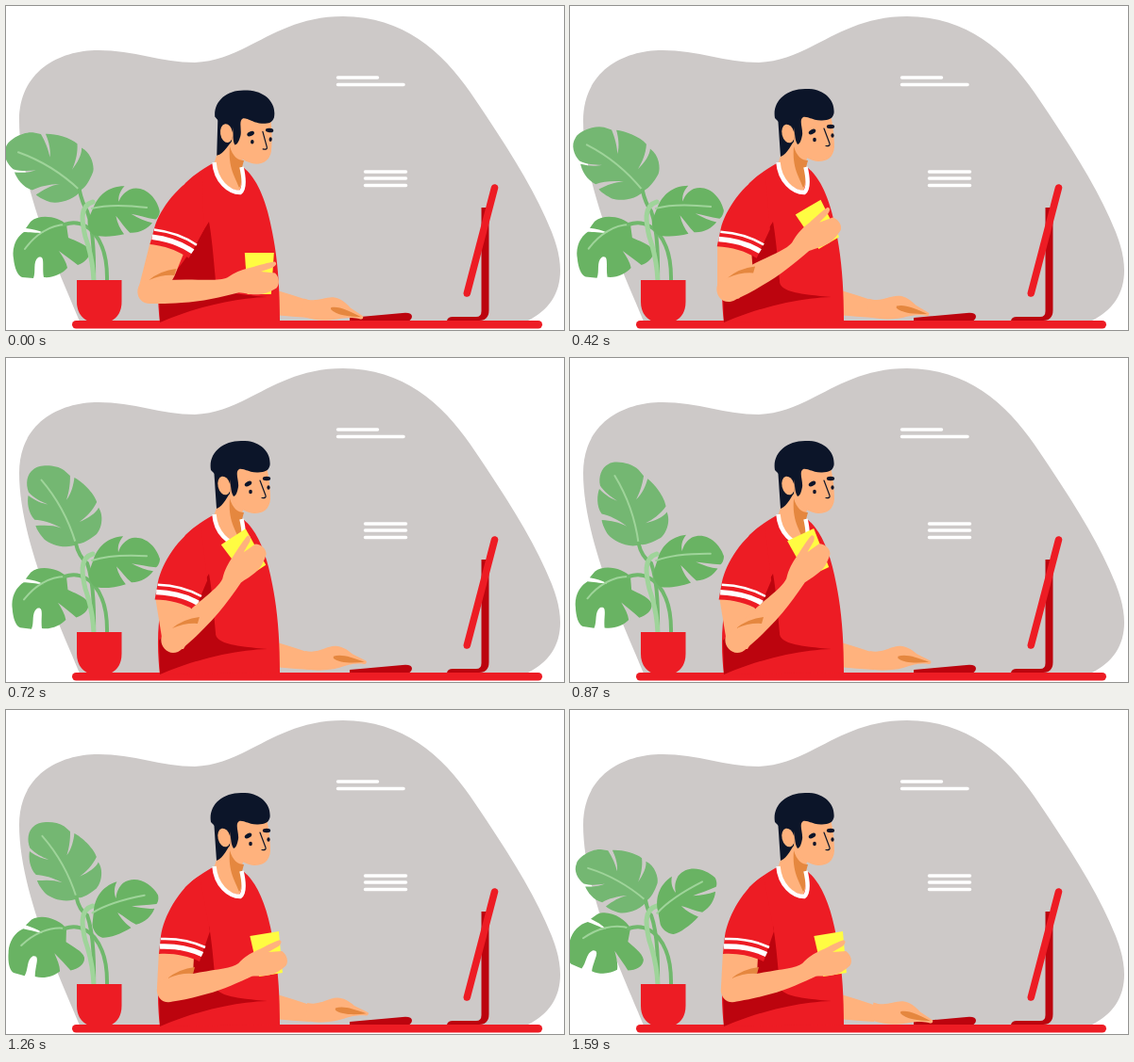
Write an HTML page that moves like this. It is 591 px wide and 344 px high and loops after 1740 ms.

```html
<!DOCTYPE html>
<html lang="en">
<head>
<meta charset="utf-8">
<title>Desk break</title>
<style>
  html, body { margin: 0; height: 100%; overflow: hidden; background: #fff; }
  svg { display: block; width: 100vw; height: 100vh; }
  .red { fill: #ed1c24; } .dark { fill: #bc040e; }
  .skin { fill: #ffb27d; } .shade { fill: #e5873f; } .ink { fill: #0c1529; }
  .leaf { fill: #69b363; } .pale { fill: #74b772; }
  .line { fill: none; stroke-linecap: round; } .flat { stroke-linecap: butt; }
  .white { stroke: #fff; } .stem { stroke: #70b86c; } .vein { stroke: #9fd49a; }
</style>
</head>
<body>
<svg viewBox="0 0 591 344">
  <path fill="#cdc9c8" d="M78 335C60 290 14 195 14 122C14 70 55 47 98 47C135 47 165 60 200 60C255 58 285 11 357 11C420 11 462 48 492 92C530 148 560 195 578 240C596 285 587 318 551 335Z"/>
  <path class="line white" stroke-width="3.5" d="M351.5 76H393.5M351.5 83.5H421M380.5 176H423.5M380.5 183H423.5M380.5 190.5H423.5"/>

  <g id="topLeaf">
    <path class="pale" d="M2 2C-12 2-24-10-27.6-19C-29-24-30-32-29-36C-20-32-12-28-6-21C-12-30-20-38-27-42C-30-52-25-63-21-68C-16-58-12-54-7-50C-12-56-17-63-19-71C-18-80-12-89-3-90C4-92 20-84 25-74L28-66C24-58 18-50 12.5-45C20-48 27-56 31-62C36-55 42-38 40-28C32-22 22-19 14-18C24-17 34-18 39-22C40-10 30 0 24 2C14 4 6 4 2 2Z"/>
    <path class="line vein" stroke-width="2" d="M0 0C5-26 4-54-1-76"/>
  </g>
  <g id="lowLeaf">
    <path class="leaf" d="M0 0C-8-8-28-12-38-3L-43 4C-36 5-30 6-24 9C-32 9-40 8-45 8C-54 14-58 26-56 36C-55 46-52 54-47 56L-35 57C-32 50-36 40-30 35C-22 32-26 44-24 56C-14 57-4 52 1 46C0 40-4 34-8 28C0 34 6 38 12 43C20 40 26 34 24 27C21 21 11 18 2 14Z"/>
    <path class="line vein" stroke-width="2" d="M0 0C-18 0-34 12-44 26"/>
  </g>
  <path id="topStem" class="line stem" stroke-width="4"/>
  <path class="line stem" stroke-width="4" d="M62 232C85 224 108 245 107 292"/>
  <path class="line vein" stroke-width="5" d="M92 208C78 212 80 228 84 245Q92 268 93 292"/>
  <g id="sideLeaf">
    <path class="leaf" d="M0 0C4-12 14-23 31-24C26-18 25-12 26-7C28-14 32-18 37-21C52-27 66-14 70 0C70 4 68 8 66 9C56 8 48 6 40 5C48 9 56 12 63 13C58 20 50 25 40 25C34 20 30 14 24 8C26 16 30 22 34 27C22 31 8 32 2 30C-4 27-6 18-5 14Z"/>
    <path class="line vein" stroke-width="2" d="M-2 2C16-4 36-4 56-3"/>
  </g>
  <path class="red" d="M75 291H122.5V314C122.5 330 112 337 99 337S75 330 75 314Z"/>

  <path class="dark" d="M503.5 214H511.5V323Q511.5 334 501 334H467Q468 330 473 330H498Q503.5 330 503.5 324Z"/>
  <path class="line" stroke="#ed1c24" stroke-width="7.5" d="M517.5 193L488.3 305"/>
  <path class="dark" d="M364 335V331L420 326Q430 325 430 330Q429 335 423 335Z"/>
  <rect class="red" x="70" y="334" width="498" height="8.5" rx="4.2"/>

  <path class="skin" d="M284 301Q304 307 322 313V331Q304 330 284 328Z"/>
  <g id="typingHand">
    <path class="skin" d="M314 311C328 314 336 305 346 305C352 305 358 308 364 313L379 320Q380 324 375 323C366 323 362 324 356 326C346 330 332 333 314 330Z"/>
    <path class="shade" d="M344 316C352 313 362 316 377 321C364 323 350 323 344 318Z"/>
  </g>

  <path class="red" d="M219 167C206 174 196 182 190 188C178 208 168 240 165 260C160 285 160 310 163 336L290 334C290 300 288 270 282 240C276 207 266 183 251 171Z"/>
  <path class="dark" d="M215 229C205 245 195 262 185 275L162 300L163 336C195 322 240 310 277 309C245 306 222 304 222 292C220 270 218 245 215 229Z"/>
  <path class="skin" d="M224 156L220 168C224 186 237 195 247 196C251 190 250 180 248 172L252 158L240 140Z"/>
  <path class="shade" d="M237 149C240 160 246 164 252 164L249 175C249 182 250 190 247 193C243 182 235 172 237 149Z"/>
  <path class="line flat white" stroke-width="4.5" d="M220.5 166C222 186 236 198 248 198C253 194 252 182 249.5 171"/>

  <g id="head">
    <path class="ink" d="M220 116L240 114L239 142C234 146 231 157 223 160C222 146 221 130 220 116Z"/>
    <path class="skin" d="M238 116H276C278 124 280 138 280 150C279 160 273 165 263 165C252 164 243 157 237 148Z"/>
    <path class="ink" d="M217 119C214 102 228 88 249 88C268 87 281 99 279.5 114C278 120 274 121 267 121.5C258 122 252 117 247 118C242 121 247 130 246 137C245 142 244 146 241 147C237 141 239 132 236 126L222 124Z"/>
    <ellipse class="skin" cx="231" cy="135.5" rx="6.5" ry="10" transform="rotate(-14 231 135.5)"/>
    <ellipse class="ink" cx="256.5" cy="133.5" rx="4" ry="2.4" transform="rotate(-28 256.5 133.5)"/>
    <ellipse class="ink" cx="276" cy="128" rx="4.2" ry="2.2"/>
    <ellipse class="ink" cx="259" cy="142" rx="1.8" ry="2.3"/>
    <ellipse class="ink" cx="278" cy="137.5" rx="1.6" ry="2.3"/>
    <path class="line" stroke="#0c1529" stroke-width="1.2" d="M269 130L275 146Q276 149 271 148.5"/>
  </g>

  <path id="upperArm" class="skin"/>
  <g id="sleeve">
    <path class="red" d="M205 176C182 190 167 220 164 240L162 259C178 258 192 261 205 267L216 235Z"/>
    <path class="line flat white" stroke-width="2.5" d="M164 243Q190 242 211 252"/>
    <path class="line flat white" stroke-width="5.5" d="M163 251Q188 250 208 259.5"/>
  </g>
  <path id="cup" fill="#fffc42" d="M-16-30H15L12 14H-13Z"/>
  <path id="forearm" class="skin" d="M0 13C-16 13-17-6-6-12L36-9C55-7 70-4 78-7C86-12 94-14 101-15C112-17 120-19 127-19Q130-16 124-13L112-10L126-7C130-2 130 5 126 9C120 12 114 14 110 14C100 14 94 11 88 10C70 13 50 16 30 15C18 15 8 14 0 13Z"/>
  <path id="crease" class="shade" d="M-2-12Q10-22 27-24L25-17Q12-18-2-12Z"/>
</svg>
<script>
const LOOP = 1740, STEP = 30, HOLD = 90, LAST = 1590;
const $ = id => document.getElementById(id);
const move = (id, value) => $(id).setAttribute('transform', value);

// Cosine ease from 0 to 1 between two moments.
function ease(t, start, end) {
  const u = Math.min(1, Math.max(0, (t - start) / (end - start)));
  return (1 - Math.cos(Math.PI * u)) / 2;
}

function turn(x, y, deg, cx, cy) {
  const a = deg * Math.PI / 180, c = Math.cos(a), s = Math.sin(a);
  return [cx + (x - cx) * c - (y - cy) * s, cy + (x - cx) * s + (y - cy) * c];
}

function drawPlant(t) {
  // The top leaf dips, rises, then drops faster; the others speed up slowly.
  const fall = ease(t, 1060, LAST);
  const rise = ease(Math.abs(t - 135), 0, 925) * (1 - fall);
  const drift = (t / LAST) ** 2.8;
  const x = 78 - 6 * rise + 2 * fall, y = 195 + 2 * rise + 7 * fall;

  move('topLeaf', `translate(${x} ${y}) rotate(${46 * rise - 60}) scale(${1 - .08 * fall})`);
  $('topStem').setAttribute('d', `M${x} ${y}Q${x + 3} ${y + 14} 86 218Q94 240 93 292`);
  move('sideLeaf', `translate(93 213) rotate(${4 - 34 * drift})`);
  move('lowLeaf', `translate(64 232) rotate(${19 * drift})`);
}

function drawMan(t) {
  const lift = ease(t, -60, 750), lower = ease(t, 930, 1260);
  const elbowX = 153 + 25 * lift - 5 * lower, elbowY = 303 - 4 * lift - 2 * lower;
  const arm = -4.8 - 42 * lift + 31 * lower, reach = 116 - 6 * lower;
  const sleeve = 9 - 5 * lift - 4 * lower;
  const tilt = -36 * ease(t, 0, 570) + 27 * ease(t, 570, 1260);
  const tap = 4.5 + 4.5 * Math.cos(6 * Math.PI * t / LAST);

  move('head', `rotate(${5.5 - 5.5 * ease(t, 0, 270)} 236 162)`);
  move('typingHand', `translate(${6 * t / LAST} 0) rotate(${tap} 318 320)`);

  const outer = turn(162, 255, sleeve, 195, 195), inner = turn(199, 262, sleeve, 195, 195);
  $('upperArm').setAttribute('d', `M${outer}L${elbowX - 13} ${elbowY - 3}
    Q${elbowX - 9} ${elbowY + 11} ${elbowX + 10} ${elbowY + 10}L${elbowX + 25} ${elbowY - 16}L${inner}Z`);
  move('sleeve', `rotate(${sleeve} 195 195)`);
  move('forearm', `translate(${elbowX} ${elbowY}) rotate(${arm}) scale(${reach / 110} 1)`);
  move('crease', `translate(${elbowX} ${elbowY})`);
  move('cup', `translate(${turn(elbowX + reach, elbowY, arm, elbowX, elbowY)}) rotate(${tilt})`);
}

function tick() {
  const now = performance.now() % LOOP;
  const t = now < HOLD ? 0 : Math.min(LAST, Math.floor(now / STEP) * STEP);
  drawPlant(t);
  drawMan(t);
  requestAnimationFrame(tick);
}
tick();
</script>
</body>
</html>
```
